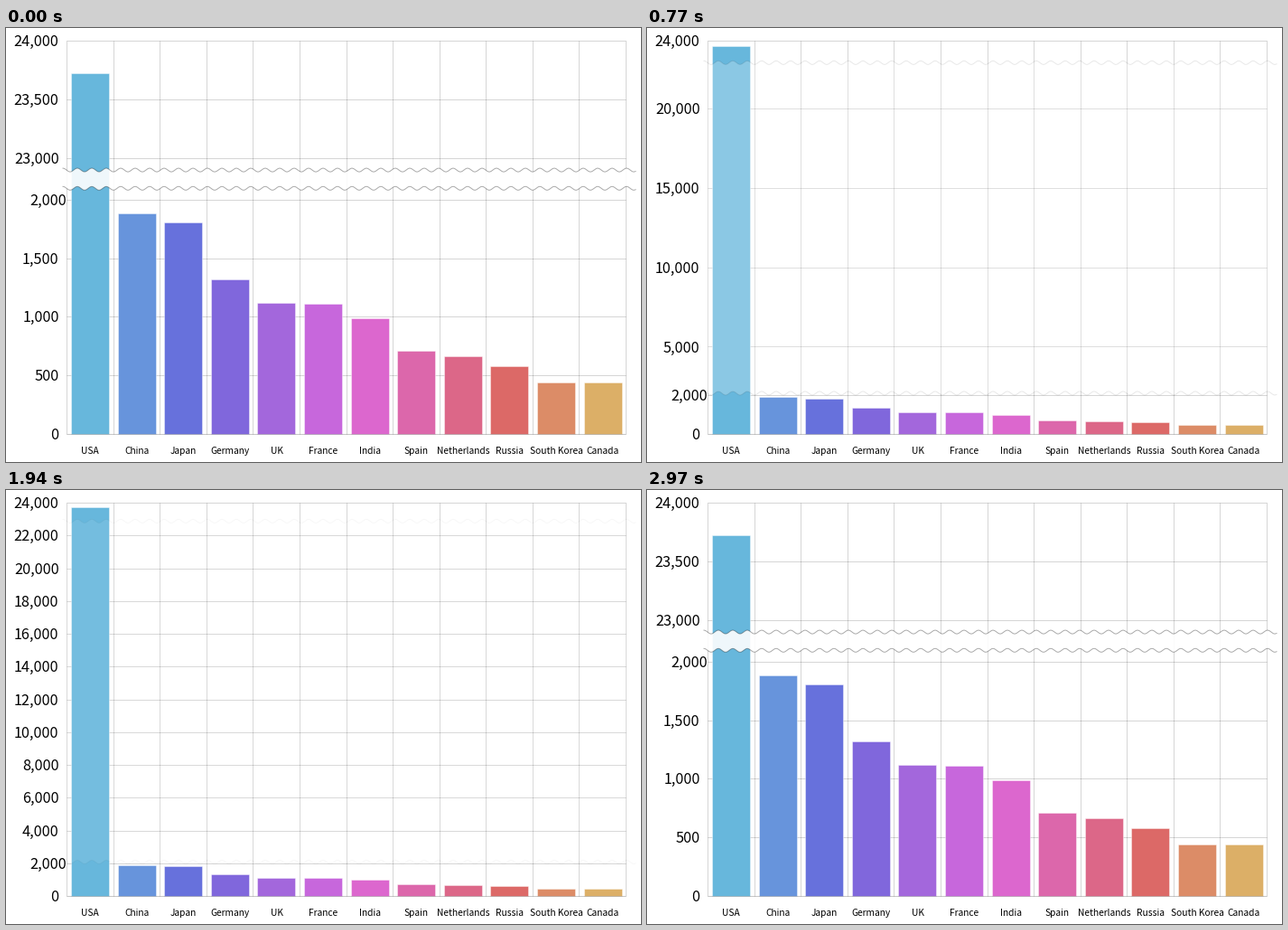
Write a matplotlib script that moves like this. It is 703 px wide and 480 px high and loops after 3450 ms.

```python
import math

import numpy as np
import matplotlib.pyplot as plt
from matplotlib.animation import FuncAnimation
from matplotlib.patches import Polygon, Rectangle

W, H, DPI = 703, 480, 100
LOOP, TICK = 3450, 15
PX = 72 / DPI  # one pixel in points

LEFT, RIGHT, TOP, BOTTOM = 67.5, 686.5, 14.5, 449.5
VMAX, LOW, HIGH = 24000, 2100, 22900
GAP = HIGH - LOW
MIN_SIZE = 0.0075
GRID_COUNT = 12
BAR_W = 42
FONT = "Noto Sans CJK JP"

DATA = [
    ("USA", 23725, "#67b7dc"), ("China", 1882, "#6794dc"),
    ("Japan", 1809, "#6771dc"), ("Germany", 1322, "#8067dc"),
    ("UK", 1122, "#a367dc"), ("France", 1114, "#c767dc"),
    ("India", 984, "#dc67ce"), ("Spain", 711, "#dc67ab"),
    ("Netherlands", 665, "#dc6788"), ("Russia", 580, "#dc6967"),
    ("South Korea", 443, "#dc8c67"), ("Canada", 441, "#dcaf67"),
]

# Moments at which the picture is refreshed, in ms
REFRESH = np.round(np.concatenate([
    [0], 152 + 77.3 * np.arange(20),
    1940 + 80 * np.arange(6), [2410],
    2500 + 70 * np.arange(3), np.linspace(2740, 2970, 4),
]), -1)


def cubic_out(p):
    return 1 - (1 - min(max(p, 0), 1)) ** 3


def openness(t):
    """0 = axis break closed, 1 = axis fully expanded."""
    if t < 1900:
        return cubic_out((t - 165) / 1427)
    return 1 - cubic_out((t - 1948) / 1000)


def nice_step(span, count):
    unit = 10 ** math.floor(math.log10(span)) / 10
    raw = math.ceil(span / count / unit - 1e-6) * unit
    power = 10 ** math.floor(math.log10(raw) + 1e-9)
    lead = math.ceil(raw / power - 1e-6)
    if lead > 5:
        lead = 10
    elif lead > 2:
        lead = 5
    return int(round(power * lead))


def crisp(v):
    """Centre of the pixel that holds v."""
    return np.floor(v) + 0.5


def y_of(value, size):
    """Pixel height of a value when the break is scaled by size."""
    inside = min(max(value - LOW, 0), GAP)
    scale = (BOTTOM - TOP) / (VMAX - GAP + GAP * size)
    return BOTTOM - scale * (value - inside + inside * size)


def tick_values(size):
    outer = nice_step(VMAX - GAP + GAP * size, GRID_COUNT)
    inner = nice_step(GAP, math.ceil(size * GRID_COUNT * GAP / VMAX))
    values = [v for v in range(0, VMAX + 1, outer) if not LOW < v < HIGH]
    return values + [v for v in range(0, VMAX, inner) if LOW < v < HIGH]


fig = plt.figure(figsize=(W / DPI, H / DPI), dpi=DPI, facecolor="white")
ax = fig.add_axes([0, 0, 1, 1])
ax.set_xlim(0, W)
ax.set_ylim(H, 0)
ax.axis("off")

# Grid
col_w = (RIGHT - LEFT) / len(DATA)
grid_style = dict(colors="black", alpha=0.16, linewidth=PX, snap=False,
                  zorder=1)
ax.vlines(crisp(LEFT + col_w * np.arange(len(DATA) + 1)), TOP, BOTTOM,
          **grid_style)
h_grid = ax.hlines([TOP], LEFT, RIGHT, **grid_style)
ax.hlines([BOTTOM], LEFT, RIGHT, colors="black", alpha=0.22,
          linewidth=PX, snap=False, zorder=3)

# Columns and their names
bars = []
for i, (name, value, color) in enumerate(DATA):
    x = crisp(LEFT + (i + 0.1) * col_w)
    bar = Rectangle((x, TOP), BAR_W, 0, facecolor=color,
                    edgecolor=(1, 1, 1, 0.4), linewidth=PX, snap=False,
                    zorder=2)
    bars.append(ax.add_patch(bar))
    ax.text(LEFT + (i + 0.5) * col_w, 471, name, ha="center", va="baseline",
            family=FONT, size=10.2 * PX, color="black", zorder=6)

# Axis break
wave_x = np.linspace(63, 697, 600)
wave = -2 * np.cos((wave_x - 63) * 2 * np.pi / 16)
gap_fill = ax.add_patch(Polygon([(0, 0), (1, 0), (1, 1)], facecolor="white",
                                edgecolor="none", zorder=4))
edges = [ax.plot(wave_x, wave, color="black", linewidth=PX, zorder=5)[0]
         for _ in range(2)]

labels = [ax.text(0, 0, "", ha="right", va="baseline", family=FONT,
                  size=16.3 * PX, color="black", zorder=6)
          for _ in range(16)]


def draw(frame):
    now = frame * TICK + TICK - 1
    opened = openness(REFRESH[REFRESH <= now][-1])
    size = MIN_SIZE + (1 - MIN_SIZE) * opened
    opacity = 1 - 0.9 * opened

    for bar, (_, value, _) in zip(bars, DATA):
        top = crisp(y_of(value, size))
        bar.set_y(top)
        bar.set_height(BOTTOM - top)

    upper, lower = y_of(HIGH, size) + wave, y_of(LOW, size) + wave
    gap_fill.set_xy(np.column_stack([
        np.r_[wave_x, wave_x[::-1]], np.r_[upper, lower[::-1]]]))
    gap_fill.set_alpha(0.9 * opacity)
    for edge, ys in zip(edges, (upper, lower)):
        edge.set_ydata(ys)
        edge.set_alpha(0.33 * opacity)

    ticks = tick_values(size)
    heights = [y_of(v, size) for v in ticks]
    h_grid.set_segments([[(LEFT, crisp(y)), (RIGHT, crisp(y))]
                         for v, y in zip(ticks, heights) if v])
    for label in labels:
        label.set_text("")
    for label, v, y in zip(labels, ticks, heights):
        label.set_text(f"{v:,}")
        label.set_position((66.5 if v == 2000 else 58.5, y + 5.5))
    return []


anim = FuncAnimation(fig, draw, frames=LOOP // TICK, interval=TICK,
                     repeat=True, repeat_delay=0, blit=False)
plt.show()
```
